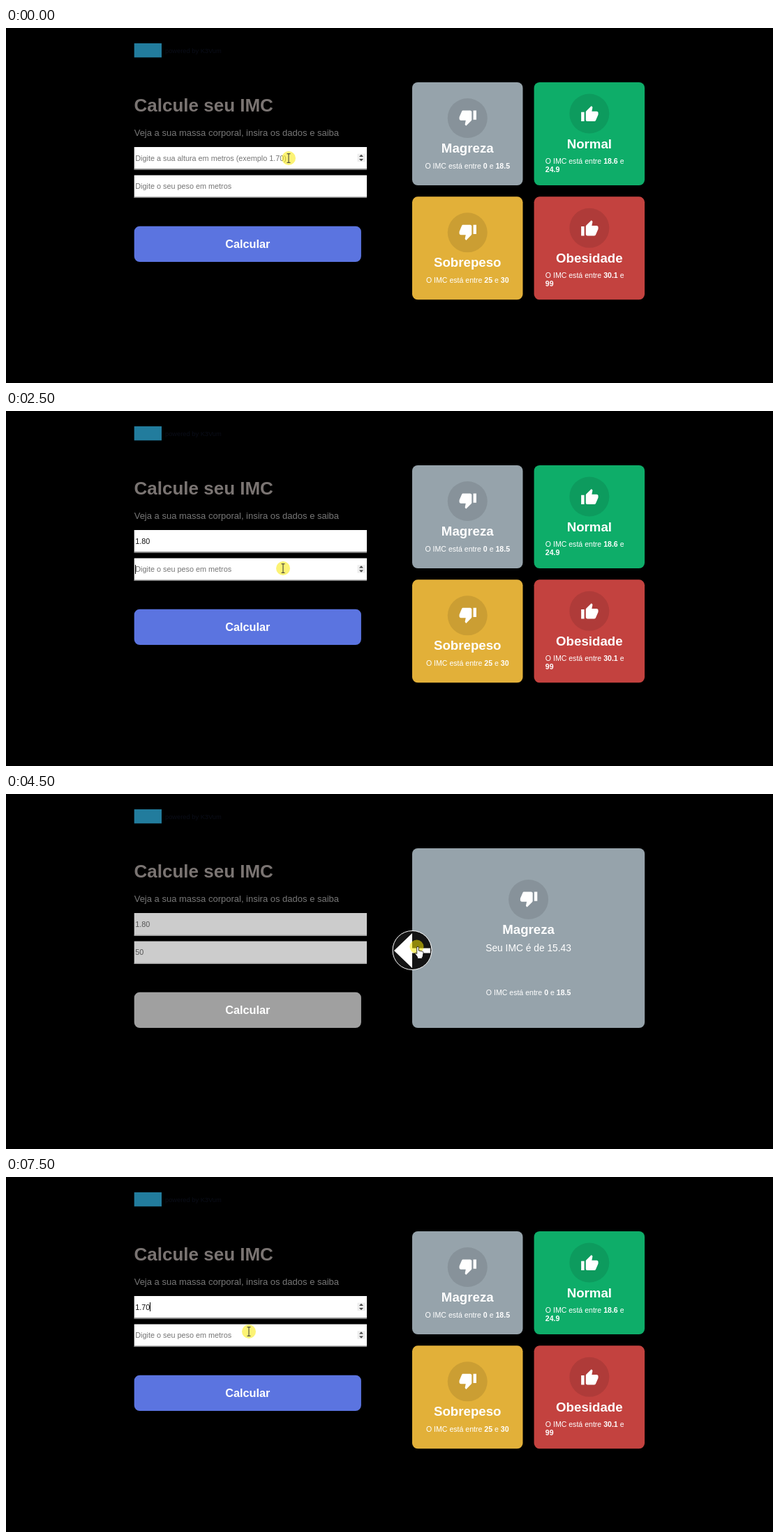
An HTML page for the animation above (8000 ms loop, 1099 by 510 pixels).

```html
<!DOCTYPE html>
<html lang="pt-BR">
<head>
<meta charset="utf-8">
<title>Calculadora de IMC</title>
<style>
  html, body { margin: 0; width: 100%; height: 100%; overflow: hidden; background: #000; }
  svg { display: block; font-family: "Liberation Sans", Arial, sans-serif; }
  .title { font: bold 18.7px "Liberation Sans", Arial, sans-serif; }
  .field { font-size: 10.84px; }
  .range { font-size: 10.57px; }
  .mid { text-anchor: middle; }
  b, .bold { font-weight: bold; }
</style>
</head>
<body>
<svg id="stage" width="1099" height="510" viewBox="0 0 1099 510"></svg>
<script>
const STEP = 500;
const FONT = 10.84;
const THUMB = 'M1 21h4V9H1zM23 10c0-1.1-.9-2-2-2h-6.3l1-4.9c0-.4-.2-.8-.5-1.1L14.2 1 7.6 7.6C7.2 8 7 8.5 7 9v10c0 1.1.9 2 2 2h9c.8 0 1.5-.5 1.8-1.2l3-7.1c.1-.2.2-.5.2-.7z';
const HAND = 'M-1.3 1a1.3 1.3 0 0 1 2.6 0v4.5l5 1q2 .4 1.7 2.5l-.8 5-1 1v2h-6.5v-2l-3.8-5.5q0-1.8 2.8 .5z';

const start = { height: '', weight: '', x: 405, y: 187, click: true };
const first = { ...start, focus: 0, caret: true, click: false };
const second = { height: '1.80', weight: '', focus: 1, caret: true, x: 397, y: 226 };
const retry = { ...first, x: 353.5, y: 191 };

// One state per half second
const states = [
  start,
  { ...first, height: '1' },
  { ...first, height: '1.' },
  { ...first, height: '1.', caret: false },
  { ...first, height: '1.8' },
  { ...second, click: true },
  { ...second, weight: '5' },
  { ...second, weight: '50' },
  { ...second, weight: '50', x: 392.5, y: 299.5, click: true, hand: true },
  { height: '1.80', weight: '50', x: 588.5, y: 219.5, click: true, hand: true, result: true },
  { ...start, x: 353.5, y: 191 },
  { ...retry, height: '1' },
  { ...retry, height: '1.' },
  { ...retry, height: '1.7' },
  { ...retry, height: '1.7' },
  { ...retry, height: '1.70', x: 348, y: 222, click: true }
];

const rect = (x, y, w, h, fill, r = 0) =>
  `<rect x="${x}" y="${y}" width="${w}" height="${h}" rx="${r}" fill="${fill}"/>`;
const text = (x, y, str, fill, cls = '', size = '') =>
  `<text x="${x}" y="${y}" fill="${fill}" class="${cls}" ${size && `font-size="${size}"`}>${str}</text>`;
const bold = str => `<tspan class="bold">${str}</tspan>`;

function badge(x, y, up) {
  return `<circle cx="${x}" cy="${y}" r="28.5" fill="#000" fill-opacity=".1"/>
    <path d="${THUMB}" fill="#fff" transform="translate(${x + .5} ${y}) rotate(${up ? 0 : 180}) scale(1.11) translate(-12 -11)"/>`;
}

function card(x, y, color, name, min, max, up) {
  const cx = x + 79.25;
  const top = up ? y - 6.5 : y;
  const range = `O IMC está entre ${bold(min)} e`;
  return rect(x, y, 158.5, 148, color, 8)
    + badge(cx, top + 51.5, up)
    + text(cx, top + 101, name, '#fff', 'title mid')
    + (up
      ? text(x + 16.2, y + 117, range, '#fff', 'range') + text(x + 16.2, y + 129, bold(max), '#fff', 'range')
      : text(cx, y + 124, `${range} ${bold(max)}`, '#fff', 'range mid'));
}

const cards = card(582, 78, '#96a3ab', 'Magreza', '0', '18.5', false)
  + card(756.6, 78, '#0ead69', 'Normal', '18.6', '24.9', true)
  + card(582, 242.3, '#e2b039', 'Sobrepeso', '25', '30', false)
  + card(756.6, 242.3, '#c3423f', 'Obesidade', '30.1', '99', true);

const result = rect(582, 78, 333.2, 258, '#96a3ab', 8)
  + badge(748.6, 151.5, false)
  + text(748.6, 201, 'Magreza', '#fff', 'title mid')
  + text(748.6, 226, 'Seu IMC é de 15.43', '#fff', 'mid', 13.8)
  + text(748.6, 289, `O IMC está entre ${bold('0')} e ${bold('18.5')}`, '#fff', 'range mid')
  + `<circle cx="582" cy="224.5" r="28" fill="#141414" stroke="#fff"/>
     <path d="M556 225l26-25v21.5h26v7h-26v21.5z" fill="#fff"/>`;

const header = rect(183.7, 22, 39.3, 20.3, '#227c9d')
  + text(228, 35.5, 'powered by K3Vum', '#0a0d18', '', 9.3)
  + text(183.5, 119.5, 'Calcule seu IMC', '#7a7472', 'bold', 26)
  + text(183.7, 154.5, 'Veja a sua massa corporal, insira os dados e saiba', '#777', '', 13);

function field(index, value, hint, state) {
  const y = 171 + index * 40.5;
  const off = state.result;
  const hover = state.y > y && state.y < y + 33;
  const focused = state.focus === index;
  let out = rect(183.7, y, 333.3, 32.5, off ? '#ccc' : '#fff')
    + rect(183.7, y + 31, 333.3, 1.6, off ? '#b4b4b4' : '#808080')
    + text(185.3, y + 19.7, value || hint, !value ? '#757575' : off ? '#555' : '#111', 'field');
  if (!off && (hover || focused)) {
    out += rect(503.5, y + 9.7, 11.5, 11.5, '#eee')
      + `<path d="M506 ${y + 14}l3-3.3 3 3.3zM506 ${y + 17}l3 3.3 3-3.3z" fill="#444"/>`;
  }
  if (focused && state.caret) {
    const em = [...value].reduce((sum, ch) => sum + (ch === '.' ? .278 : .556), 0);
    out += rect(Math.floor(185.4 + em * FONT), Math.round(y + 9), 1, 13, '#000');
  }
  return out;
}

function pointer({ x, y, click, hand }) {
  const glow = click ? `<circle cx="${x}" cy="${y}" r="10" fill="#fae800" fill-opacity=".54"/>` : '';
  const shape = hand
    ? `<path d="${HAND}" transform="translate(${x + 1.5} ${y})" fill="#fff" stroke="#000" stroke-width=".8"/>`
    : `<path d="M${x - 2.5} ${y - 6.3}h5M${x - 2.5} ${y + 6.3}h5M${x} ${y - 6.3}v12.6" stroke="#333" fill="none"/>`;
  return glow + shape;
}

function draw(state) {
  const button = state.result ? '#a0a0a0' : state.hand ? '#3450ce' : '#5b74e0';
  return header
    + field(0, state.height, 'Digite a sua altura em metros (exemplo 1.70)', state)
    + field(1, state.weight, 'Digite o seu peso em metros', state)
    + rect(183.7, 284.7, 325.2, 51.3, button, 8)
    + text(346.3, 315.8, 'Calcular', '#fff', 'bold mid', 16.25)
    + (state.result ? result : cards)
    + pointer(state);
}

const stage = document.getElementById('stage');
let shown = -1;
function tick() {
  const step = Math.floor(performance.now() / STEP) % states.length;
  if (step !== shown) {
    shown = step;
    stage.innerHTML = draw(states[step]);
  }
  requestAnimationFrame(tick);
}
tick();
</script>
</body>
</html>
```
